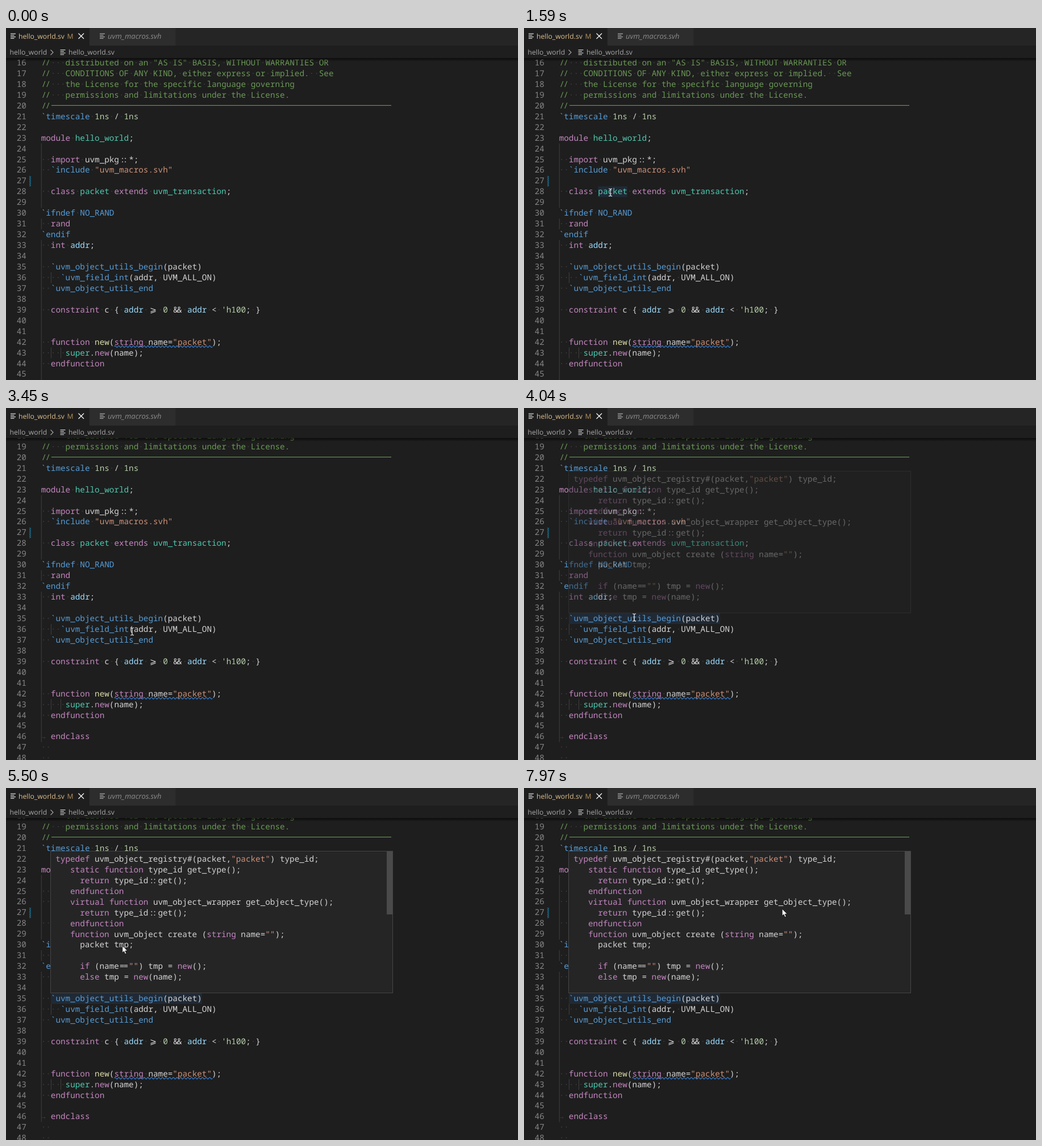
Write an HTML page that moves like this. It is 901 by 621 pixels and loops after 8 s.

```html
<!DOCTYPE html>
<html lang="en">
<head>
<meta charset="utf-8">
<title>Code editor hover</title>
<style>
html, body { margin: 0; width: 100%; height: 100%; overflow: hidden; background: #1e1e1e; }
svg { display: block; }
text { font: 14.3px "Noto Sans Mono", "DejaVu Sans Mono", "DejaVu Sans", monospace; text-rendering: geometricPrecision; }
.ui text { font: 12.2px "Open Sans", "Noto Sans", sans-serif; }
.ui text.it { font-size: 13px; font-style: italic; }
</style>
</head>
<body>
<svg id="stage" width="901" height="621" viewBox="0 0 901 621">
  <defs>
    <linearGradient id="shade" x2="0" y2="1">
      <stop stop-color="#000" stop-opacity=".6"/>
      <stop offset="1" stop-color="#000" stop-opacity="0"/>
    </linearGradient>
    <pattern id="hatch" width="3" height="3" patternUnits="userSpaceOnUse">
      <path d="M-1 1L1 -1M0 3L3 0M2 4L4 2" stroke="#1b81a8" stroke-width="1.1"/>
    </pattern>
    <g id="file" fill="none" stroke-width="1.2">
      <path d="M0 0H9M0 2.7H6.5M0 5.4H9M0 8.1H6.5"/>
    </g>
  </defs>
  <g id="editor"></g>
  <rect y="53" width="901" height="6" fill="url(#shade)"/>
  <g class="ui">
    <rect width="901" height="53" fill="#1e1e1e"/>
    <rect x="146.5" width="755" height="31" fill="#252526"/>
    <rect x="147" width="151.5" height="31" fill="#2d2d2d"/>
    <use href="#file" x="8" y="10.2" stroke="#d4d7d6"/>
    <text x="22" y="19" fill="#e2c08d">hello_world.sv</text>
    <text x="107.5" y="19" fill="#b5925f">M</text>
    <path d="M127.5 9.5L137 19M137 9.5L127.5 19" stroke="#fff" stroke-width="1.2"/>
    <use href="#file" x="165" y="10.2" stroke="#a4a6a5"/>
    <text class="it" x="179" y="19" fill="#8b8b8b">uvm_macros.svh</text>
    <text x="6.5" y="47" fill="#a9a9a9">hello_world</text>
    <path d="M78.5 38.5L83 43L78.5 47.5" fill="none" stroke="#a9a9a9" stroke-width="1.1"/>
    <use href="#file" x="95.5" y="38.7" stroke="#c5c8c6"/>
    <text x="110" y="47" fill="#a9a9a9">hello_world.sv</text>
  </g>
  <g id="tip"></g>
  <g id="macro"></g>
  <path id="beam" fill="none" stroke="#fff" stroke-width="1.1"
    d="M-3 -6.5Q0 -6.5 0 -5.3Q0 -6.5 3 -6.5M0 -5.5V5.5M-3 6.5Q0 6.5 0 5.3Q0 6.5 3 6.5"/>
  <path id="arrow" fill="#fff" stroke="#000" stroke-width=".7"
    d="M.3 .3V12.6L3.1 10L5.2 14.7L7.3 13.8L5.2 9.3H9.2Z"/>
</svg>
<script>
const CELL = 8.58, ROW = 18.948, LEFT = 61.7, FIRST = 16;
const $ = id => document.getElementById(id);
const rowY = n => 66 + (n - FIRST) * ROW; // text baseline

const lines = String.raw`//   distributed on an "AS IS" BASIS, WITHOUT WARRANTIES OR
//   CONDITIONS OF ANY KIND, either express or implied.  See
//   the License for the specific language governing
//   permissions and limitations under the License.
//
~timescale 1ns / 1ns

module hello_world;

  import uvm_pkg::*;
  ~include "uvm_macros.svh"

  class packet extends uvm_transaction;

~ifndef NO_RAND
  rand
~endif
  int addr;

  ~uvm_object_utils_begin(packet)
    ~uvm_field_int(addr, UVM_ALL_ON)
  ~uvm_object_utils_end

  constraint c { addr >= 0 && addr < 'h100; }


  function new(string name="packet");
     super.new(name);
  endfunction

→_endclass
  
  `.replace(/~/g, '`').replace('→_', '→\u00a0').split('\n');

const macroText = `typedef uvm_object_registry#(packet,"packet") type_id;
   static function type_id get_type();
     return type_id::get();
   endfunction
   virtual function uvm_object_wrapper get_object_type();
     return type_id::get();
   endfunction
   function uvm_object create (string name="");
     packet tmp;

     if (name=="") tmp = new();
     else tmp = new(name);`.split('\n');

const DIM = '#3e3e3d';
const rules = [
  ['#6a9955', /\/\/.*/],
  ['#569cd6', /`\w+|\bNO_RAND\b/],
  ['#ce9178', /"[^"]*"/],
  ['#dcdcaa', /(?<=function )new\b/],
  ['#c586c0', /\b(?:module|import|class|extends|rand|int|constraint|function|string|endfunction|endclass|typedef|static|return|virtual|if|else|new)\b/],
  ['#4ec9b0', /\bhello_world\b|(?<=class )packet\b|\buvm_transaction\b|\bsuper\b/],
  ['#9cdcfe', /(?<!\()\baddr\b/],
  ['#b5cea8', /'h\d+|\b\d\w*/],
  [DIM, /→/],
  ['#d4d4d4', /::|&&|==|>=|\w+|[^\w\s]/]
];
const token = new RegExp(rules.map(r => `(${r[1].source})`).join('|'), 'g');
const ligature = { '//': -1.5, '::': -3.5, '&&': -2, '==': -1.7, '>=': 0 }; // letter spacing

function add(parent, name, attrs, content = '') {
  const e = document.createElementNS('http://www.w3.org/2000/svg', name);
  for (const k in attrs) e.setAttribute(k, attrs[k]);
  e.textContent = content;
  return parent.appendChild(e);
}

function write(parent, s, x, y, fill) {
  const gap = ligature[s];
  if (gap === undefined) return add(parent, 'text', { x, y, fill }, s);
  add(parent, 'text', {
    x: x + CELL + gap / 2, y, fill, 'text-anchor': 'middle', 'letter-spacing': gap
  }, s === '>=' ? '⩾' : s);
}

function code(parent, line, x, y, dots) {
  if (dots) for (const m of line.matchAll(/ /g)) write(parent, '·', x + m.index * CELL, y, DIM);
  for (const m of line.matchAll(token)) {
    const fill = rules[m.slice(1).findIndex(g => g !== undefined)][0];
    for (const w of m[0].matchAll(/\S+/g)) write(parent, w[0], x + (m.index + w.index) * CELL, y, fill);
  }
}

function mark(row, col, len) {
  return add(editor, 'rect', {
    x: LEFT + col * CELL, y: rowY(row) - 14, width: len * CELL, height: ROW, fill: '#202a36'
  });
}

function guide(from, to, col) {
  add(editor, 'rect', {
    x: LEFT + col * CELL, y: rowY(from) - 14, width: 1, height: (to - from + 1) * ROW, fill: '#404040'
  });
}

function panel(parent, x, y, width, height, text) {
  add(parent, 'rect', { x, y, width, height, fill: '#252526', stroke: '#454545' });
  text.forEach((s, i) => code(parent, s, x + 8.8, y + 18.4 + i * ROW));
}

const editor = $('editor');
const nameMark = mark(28, 8, 6), macroMark = mark(35, 2, 31);
guide(24, 29, 0);
guide(31, 31, 0);
guide(33, 46, 0);
guide(36, 36, 2);
guide(43, 43, 2);
guide(43, 43, 4);
lines.forEach((s, i) => {
  const n = FIRST + i, y = rowY(n);
  write(editor, String(n), 18.8, y, '#858585');
  code(editor, s, LEFT, y, true);
});
add(editor, 'rect', { x: 80, y: 136, width: 598, height: 1.1, fill: '#6a9955' });
add(editor, 'rect', { x: 41, y: 261, width: 3, height: 18.5, fill: 'url(#hatch)' });
add(editor, 'path', {
  d: 'M190.5 562q1.6 -3 3.2 0' + 't3.2 0'.repeat(53), fill: 'none', stroke: '#3794ff', 'stroke-width': 1.1
});

panel($('tip'), 130.5, 251.5, 137, 28, ['class packet']);
panel($('macro'), 78.5, 111.5, 602, 250, macroText);
const bar = add($('macro'), 'rect', { x: 670, y: 112, width: 10, height: 111, fill: '#4a4a4a' });

// pointer stops: tick, x, y
const TICK = 66.35;
const stops = [
  [2, 712, 510], [4, 551, 396.5], [6, 551, 396.5], [10, 113, 339], [11, 113, 339],
  [15, 217, 372], [20, 152, 290], [31, 152, 290], [34, 266, 345], [36, 231, 394.3],
  [41, 231, 394.3], [43, 222, 394.3], [52, 222, 394.3], [57, 194, 369.5], [70, 194, 369.5],
  [74, 193.3, 278], [78, 193.3, 278], [83, 204.5, 278], [88, 204.5, 278], [89, 206, 278],
  [99, 206, 278], [111, 478, 176], [118, 478, 176], [120, 454, 213]
];

function pointer(k) {
  const i = stops.findIndex(s => s[0] >= k);
  if (i < 0) return stops[stops.length - 1].slice(1);
  const b = stops[i], a = stops[Math.max(0, i - 1)];
  const u = b === a ? 1 : (k - a[0]) / (b[0] - a[0]), e = u * u * (3 - 2 * u);
  return [1, 2].map(j => a[j] + (b[j] - a[j]) * e);
}

const show = (e, opacity) => e.setAttribute('opacity', Number(opacity));

function draw() {
  const k = Math.floor((performance.now() % 8000 + 8) / TICK);
  editor.setAttribute('transform', `translate(0 ${k < 52 ? 0 : -50})`);
  show(nameMark, k >= 24 && k < 33);
  show(macroMark, k >= 60);
  show($('tip'), k < 25 || k >= 33 ? 0 : k === 25 ? .7 : 1);
  show($('macro'), k < 61 ? 0 : k === 61 ? .4 : k === 62 ? .93 : 1);
  show(bar, k >= 67);
  const [x, y] = pointer(k), inside = k > 70 && y < 361;
  for (const id of ['beam', 'arrow']) {
    $(id).setAttribute('transform', `translate(${x} ${y})`);
    show($(id), k >= 2 && inside === (id === 'arrow'));
  }
  requestAnimationFrame(draw);
}
draw();
</script>
</body>
</html>
```
